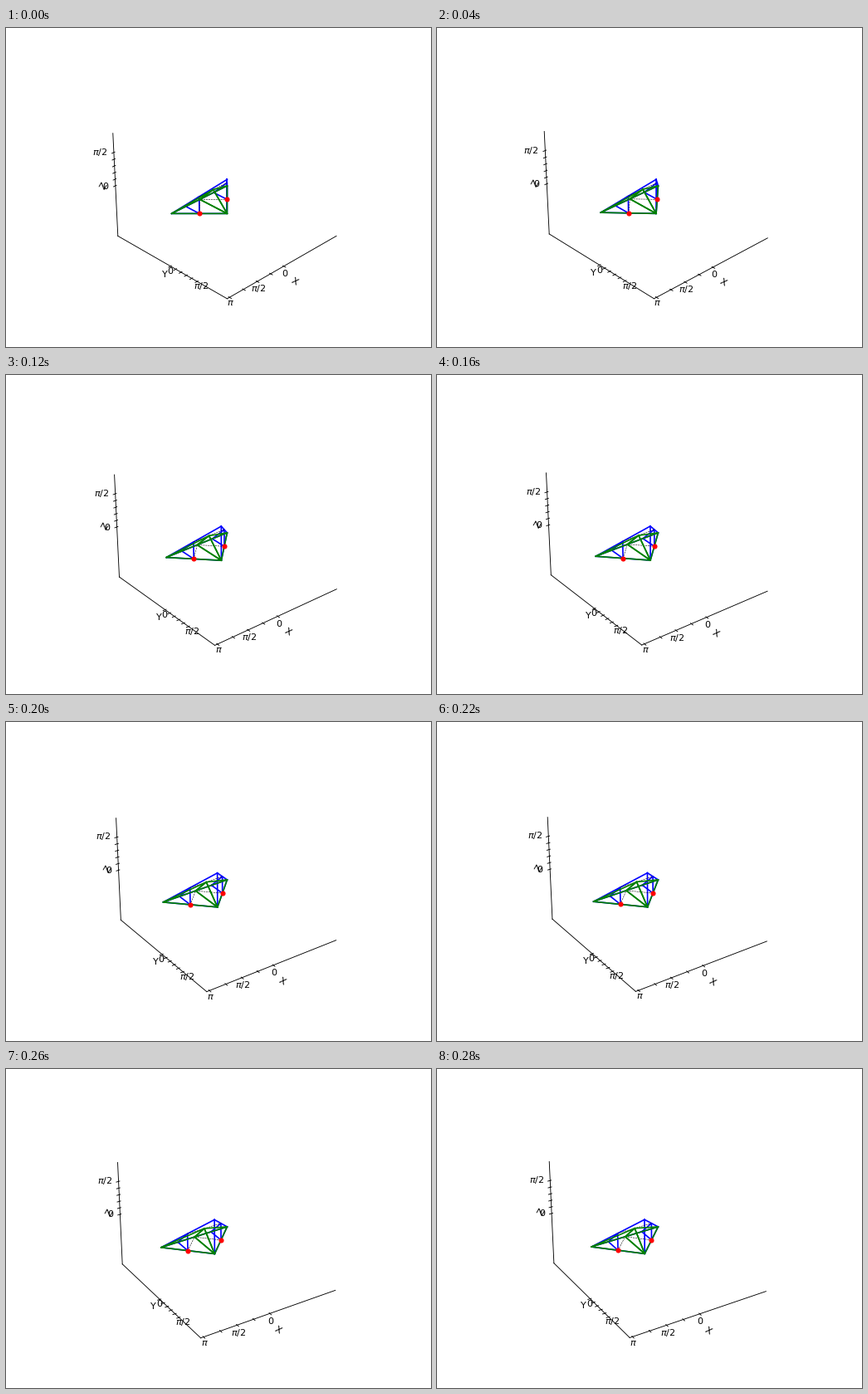
A matplotlib script for the animation above (300 ms loop, 512 px wide and 384 px high).

```python
import numpy as np
import matplotlib.pyplot as plt
from matplotlib.animation import FuncAnimation

W, H, DPI = 512, 384, 80
FRAMES, INTERVAL = 15, 20
PI = np.pi

# Camera: perspective at a fixed distance, fixed elevation
ELEV, AZIM0, DIST = np.radians(30), 45, 10
SIDE = 0.77 * H
ZOOM = SIDE / 0.185
CX = 0.5125 * W - SIDE / 2 + SIDE * 0.095 / 0.185
CY = 0.89 * H - SIDE * 0.095 / 0.185
UNIT = 1.8294640721620434 * 4 / np.sqrt(41) / (2 * PI)

# Box limits and the length of one point of padding, in data units
LIM = PI * 25 / 24 * np.array([1, 1, 0.75])
PAD = 48 / (2 * SIDE * 72 / DPI) * PI / 6 * np.array([1, 1, 0.75])
TICK = PI / 6

plt.rcParams["font.family"] = "DejaVu Sans"
plt.rcParams["font.size"] = 10

fig = plt.figure(figsize=(W / DPI, H / DPI), dpi=DPI, facecolor="white")
ax = fig.add_axes([0, 0, 1, 1])
ax.set_xlim(0, W)
ax.set_ylim(H, 0)
ax.axis("off")


def project(points, azim):
    x, y, z = np.asarray(points, float).T * UNIT
    a = np.radians(azim)
    side = y * np.cos(a) - x * np.sin(a)
    fwd = x * np.cos(a) + y * np.sin(a)
    up = z * np.cos(ELEV) - fwd * np.sin(ELEV)
    depth = DIST - fwd * np.cos(ELEV) - z * np.sin(ELEV)
    return CX + ZOOM * side / depth, CY - ZOOM * up / depth


lines, texts = [], []


def add_line(points, **style):
    art, = ax.plot([], [], **style)
    lines.append((art, np.array(points, float)))


def add_text(label, point, **style):
    art = ax.text(0, 0, label, **style)
    texts.append((art, np.array([point], float)))


def add_axis(dim, corner, tick_dir, ticks, labels, tick_pad, align,
             name, name_pad, name_rot):
    """One box edge with ticks, tick labels and a name."""
    corner, tick_dir = np.array(corner, float), np.array(tick_dir, float)
    black = dict(color="black", lw=0.8)

    def at(value):
        p = corner * LIM
        p[dim] = value
        return p

    add_line([at(-LIM[dim]), at(LIM[dim])], **black)
    for value, label in zip(ticks, labels):
        p = at(value)
        add_line([p - 0.1 * TICK * tick_dir, p + 0.2 * TICK * tick_dir], **black)
        if label:
            add_text(label, p + tick_pad * PAD * corner, **align)
    add_text(name, at(0) + name_pad * PAD * corner,
             ha="center", va="center", rotation=name_rot, rotation_mode="anchor")


HALF = r"$\pi/2$"
fine = np.linspace(0, PI / 2, 6)
fine_labels = ["$0$", "", "", "", "", HALF]

add_axis(0, (0, 1, -1), (0, 1, 0), np.linspace(0, PI, 5),
         ["$0$", "", HALF, "", r"$\pi$"], 1.5, dict(ha="center", va="top"),
         "X", 13, -30)
add_axis(1, (1, 0, -1), (1, 0, 0), fine, fine_labels, 4,
         dict(ha="left", va="center"), "Y", 7, 0)
add_axis(2, (1, -1, 0), (1, 0, 0), fine, fine_labels, 4,
         dict(ha="right", va="center"), "Z", 7, 60)

# Solid corners and inner points, in multiples of pi
P = {
    "O": (0, 0, 0), "B": (1, 0, 0), "A": (.5, .5, 0), "T": (.5, .5, .5),
    "L": (.5, 0, 0), "C": (.5, .25, .25),
    "M": (.75, .25, 0), "N": (.75, .25, .25), "R": (.75, 0, 0),
    "Q": (.25, .25, 0), "S": (.25, .25, .25), "K": (.25, 0, 0),
}


def add_paths(paths, **style):
    for path in paths.split():
        add_line([PI * np.array(P[c]) for c in path], **style)


add_paths("OBAO OT BT AT RMNR KQSK", color="blue", lw=1.5)
add_paths("ML QL NS", color="black", lw=0.5, ls="--")
# Two tetrahedra sharing the face L, A, C
add_paths("OLAOCL AC BLABCL AC", color="green", lw=1.5)
add_paths("M Q", color="red", ls="none", marker="o", ms=4.5, mew=1)


def update(i):
    azim = AZIM0 + i
    for art, pts in lines:
        art.set_data(*project(pts, azim))
    for art, pts in texts:
        x, y = project(pts, azim)
        art.set_position((x[0], y[0]))
    return [art for art, _ in lines + texts]


anim = FuncAnimation(fig, update, frames=FRAMES, interval=INTERVAL,
                     repeat=True, repeat_delay=0, blit=False)
plt.show()
```
